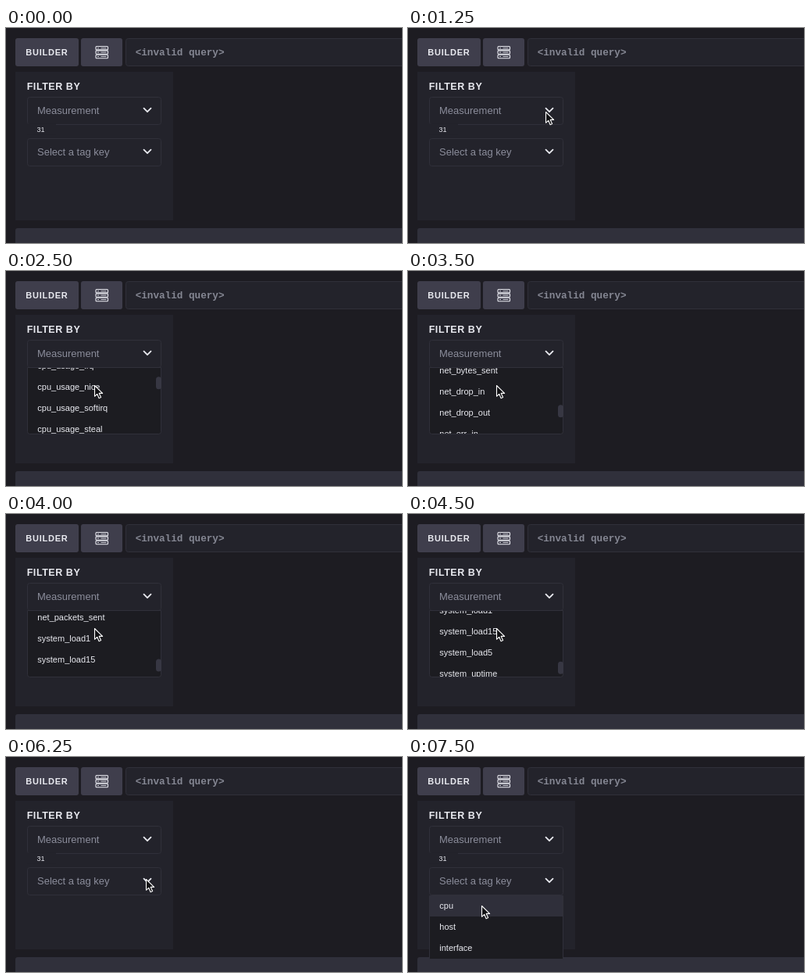
Recreate the animation shown at these times as an HTML page. Size 507 by 275 pixels, loop 8 s.

```html
<!DOCTYPE html>
<html lang="en">
<head>
<meta charset="utf-8">
<title>Query builder</title>
<style>
  html, body { margin: 0; width: 100%; height: 100%; overflow: hidden; background: #1d1c22; }
  svg { display: block; }
  text { font-family: "Liberation Sans", Arial, sans-serif; fill: #e9eaf0; }
  .bold { font-weight: 700; }
  .hint { font-size: 13px; fill: #8b8d9b; }
  .item { font-size: 11px; }
  .query { font: 700 12.65px "Liberation Mono", "Courier New", monospace; fill: #858793; }
  .button { fill: #3f3e4c; }
  .field { fill: #23232b; stroke: #30303a; }
  .line { fill: none; stroke: #e9eaf0; }
  .list { fill: #1c1c21; }
  .hover { fill: #2f2f3a; }
</style>
</head>
<body>
<svg id="stage" width="507" height="275" viewBox="0 0 507 275">
  <rect class="button" x="12" y="13" width="81" height="36" rx="3"/>
  <text class="bold" x="25.3" y="35" font-size="11" letter-spacing=".75">BUILDER</text>

  <rect class="button" x="96" y="13" width="53" height="36" rx="3"/>
  <g class="line" stroke-width="1.1">
    <rect x="115" y="23.5" width="15.5" height="4.4" rx="1"/>
    <rect x="115" y="28.9" width="15.5" height="4.4" rx="1"/>
    <rect x="115" y="34.3" width="15.5" height="4.4" rx="1"/>
    <path d="M117 25.7h2M117 31.1h2M117 36.5h2M121.5 25.7h7M121.5 31.1h7M121.5 36.5h7" stroke-width=".8"/>
  </g>

  <rect class="field" x="153.5" y="13.5" width="370" height="35" rx="3"/>
  <text class="query" x="165.7" y="34.5">&lt;invalid query&gt;</text>

  <rect x="12" y="56" width="202" height="190" fill="#23232b"/>
  <rect x="12" y="256" width="520" height="40" rx="3" fill="#30303b"/>
  <text class="bold" x="26.7" y="79" font-size="12.5" letter-spacing=".55">FILTER BY</text>

  <g id="select">
    <rect class="field" x="27.5" y="88.5" width="171" height="35" rx="3"/>
    <path class="line" d="M176.5 102.7l4.5 4.5l4.5-4.5" stroke-width="1.8" stroke-linecap="round" stroke-linejoin="round"/>
  </g>
  <use href="#select" y="53"/>
  <text class="hint" x="40" y="110">Measurement</text>
  <text class="hint" x="40" y="163">Select a tag key</text>
  <rect x="27" y="122.5" width="37" height="14" fill="#23232b"/>
  <text x="39.5" y="133" font-size="9">31</text>

  <g id="measures">
    <path class="list" d="M27.5 123.5h171v82a3 3 0 0 1-3 3h-165a3 3 0 0 1-3-3z" stroke="#30303a"/>
    <svg x="28" y="124" width="171" height="84" overflow="hidden">
      <rect id="measureHover" class="hover" y="3" width="163" height="27"/>
      <g id="rows"></g>
      <rect id="thumb" x="164" width="7" height="16" rx="3.5" fill="#373743"/>
    </svg>
  </g>

  <g id="tags">
    <path class="list" d="M27.5 177.5h171v81h-171z" stroke="#30303a"/>
    <rect id="tagHover" class="hover" x="28" y="177" width="170" height="27"/>
    <g id="tagRows" transform="translate(28 177)"></g>
  </g>

  <path id="cursor" d="M.5 .5v13.8l3.2-3 2.4 5.4 2.5-1.1-2.4-5.2h4.4z" fill="#111114" stroke="#fff" stroke-width="1.1" stroke-linejoin="round"/>
</svg>
<script>
  const LOOP = 8000, TICK = 250, ROW = 27, VIEW = 84, THUMB = 16;
  const $ = id => document.getElementById(id);
  const group = (name, keys) => keys.split(" ").map(key => name + "_" + key);

  const measures = [
    ...group("cpu_usage", "guest guest_nice idle iowait irq nice softirq steal system user"),
    ...group("disk", "free inodes_free inodes_total inodes_used total used used_percent"),
    "mem_used_percent",
    ...group("net", "bytes_recv bytes_sent drop_in drop_out err_in err_out packets_recv packets_sent"),
    ...group("system", "load1 load15 load5 uptime uptime_format")
  ];
  const maxScroll = measures.length * ROW - VIEW;

  function fill(parent, names) {
    names.forEach((name, i) => {
      const row = document.createElementNS("http://www.w3.org/2000/svg", "text");
      row.setAttribute("class", "item");
      row.setAttribute("x", 12.3);
      row.setAttribute("y", i * ROW + 17.2);
      row.textContent = name;
      parent.append(row);
    });
  }
  fill($("rows"), measures);
  fill($("tagRows"), ["cpu", "host", "interface"]);

  // [time, x, y]
  const pointer = [
    [500, 81, 232], [1000, 198, 130], [1250, 176, 107], [1500, 179, 99], [1750, 179, 101],
    [2250, 113, 146], [4750, 113, 146], [5000, 124, 138], [5250, 166, 110], [5500, 178, 101],
    [5750, 179, 103], [6250, 179, 156], [6500, 179, 157], [6750, 146, 169], [7000, 94, 190]
  ];
  // [time, offset]
  const scroll = [
    [2000, 0], [2250, 40], [2500, 124.5], [3000, 300], [3500, 523.5],
    [4000, 680], [4500, 716], [4750, maxScroll]
  ];

  function sample(track, t) {
    const next = track.findIndex(key => key[0] > t);
    if (next < 0) return track[track.length - 1].slice(1);
    if (next === 0) return track[0].slice(1);
    const a = track[next - 1], b = track[next];
    const p = (t - a[0]) / (b[0] - a[0]);
    return a.slice(1).map((v, i) => v + (b[i + 1] - v) * p);
  }

  const show = (id, on) => { $(id).style.display = on ? "" : "none"; };
  const move = (id, x, y) => $(id).setAttribute("transform", `translate(${x} ${y})`);

  function draw() {
    const t = Math.floor(performance.now() % LOOP / TICK) * TICK;
    const [x, y] = sample(pointer, t);
    const [top] = sample(scroll, t);
    show("cursor", t >= 500);
    move("cursor", Math.round(x), Math.round(y));
    show("measures", t >= 1750 && t < 5750);
    show("measureHover", t >= 4750);
    move("rows", 0, -top);
    move("thumb", 0, top / maxScroll * (VIEW - THUMB));
    show("tags", t >= 6500);
    show("tagHover", t >= 7000);
    requestAnimationFrame(draw);
  }
  draw();
</script>
</body>
</html>
```
